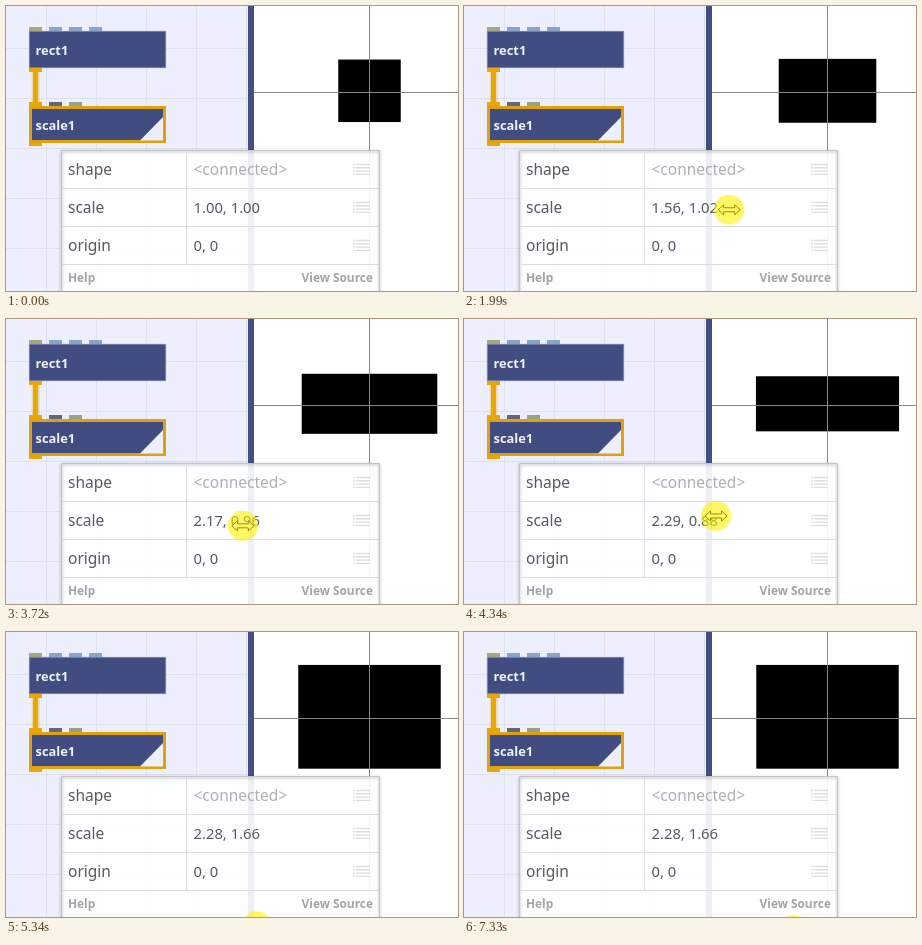
An HTML page for the animation above (7.41 s loop, 452 px wide and 285 px high).

```html
<!DOCTYPE html>
<html lang="en">
<head>
<meta charset="utf-8">
<title>Scaling a rectangle</title>
<style>
html, body { margin: 0; width: 100%; height: 100%; overflow: hidden; background: #fff; }
svg { display: block; width: 452px; height: 285px; font: 15.5px "Noto Sans", "Open Sans", sans-serif; fill: #5a5a5a; }
.node { font-size: 12.9px; font-weight: 600; fill: #f0f2fa; }
.value { font-size: 14.8px; }
.muted { fill: #b0b0b0; }
.foot { font-size: 11.9px; font-weight: 600; fill: #a4a4a4; }
.lines { stroke: #ddd; fill: none; }
#edge { fill: none; stroke: #c4c4c4; filter: drop-shadow(0 1px 1.5px #0006); }
#cursor { fill: #fff; stroke: #000; stroke-linejoin: round; }
</style>
</head>
<body>
<svg viewBox="0 0 452 285">
  <pattern id="grid" x="40" y="42" width="50" height="50" patternUnits="userSpaceOnUse">
    <path fill="#edf0fc" d="M0 0H50V50H0Z"/>
    <path stroke="#dfe2ee" d="M.5 0V50M0 .5H50"/>
  </pattern>
  <path fill="url(#grid)" d="M0 0H242V285H0Z"/>
  <path fill="#434f83" d="M242 0H248V285H242Z"/>

  <rect id="shape" fill="#000"/>
  <path stroke="#888" d="M248 86.5H452M363.5 0V285"/>

  <path fill="#a6a77a" d="M23 21h13v4h-13z"/>
  <path fill="#87a5c9" d="M43 21h13v4h-13zM63 21h13v4h-13zM83 21h13v4h-13z"/>
  <path fill="#62677f" d="M43 96h13v4h-13z"/>
  <path fill="#93a486" d="M63 96h13v4h-13z"/>
  <path fill="#414d80" stroke="#7c85ab" stroke-width=".6" d="M23.3 25.3H159.7V61.7H23.3Z"/>
  <path stroke="#e9a703" stroke-opacity=".3" stroke-width="8" d="M29.7 66V96"/>
  <path fill="#e9a703" d="M23 62h13v4h-4v30h4v4h-13v-4h4v-30h-4zM23 136h13v4h-13z"/>
  <path fill="#414d80" stroke="#e0a20c" stroke-width="3" d="M24.5 101.5H158.5V135.5H24.5Z"/>
  <path fill="#edf0fc" d="M157 111V134.5H134Z"/>
  <text class="node" x="29.5" y="49">rect1</text>
  <text class="node" x="29.5" y="124">scale1</text>

  <path fill="#fff" fill-opacity=".91" d="M55 144H374V290H55Z"/>
  <path id="edge" d="M55.5 144.5H373.5V290H55.5Z"/>
  <path id="hover" fill="#f0f0f0" d="M337 183H373V220H337Z"/>
  <path class="lines" d="M56 182.5H373M56 220.5H373M56 258.5H373M180.5 145V258"/>
  <g id="icons" class="lines" stroke-width="1.4"></g>
  <text x="62" y="169">shape</text>
  <text x="62" y="207">scale</text>
  <text x="62" y="245">origin</text>
  <text class="muted" x="187.5" y="169">&lt;connected&gt;</text>
  <text class="value" x="187.5" y="207" id="scale"></text>
  <text class="value" x="187.5" y="245">0, 0</text>
  <text class="foot" x="62" y="276">Help</text>
  <text class="foot" x="367" y="276" text-anchor="end">View Source</text>

  <g id="mouse">
    <path id="cursor"/>
    <circle id="press" r="15" fill="#fff200" fill-opacity=".6"/>
  </g>
</svg>
<script>
const LOOP = 7410, GAIN = 0.008, UNIT = 62.5;
const $ = id => document.getElementById(id);

const linear = u => u;
const slowStart = u => u ** 1.446;
const slowEnd = u => 1 - (1 - u) ** 2;

// Each move goes on from the last one; bend pushes the middle of its path aside.
const home = [283, 290];
const moves = [
  { start: 140, end: 900, to: [195, 201], bend: [0, 0], ease: linear },
  { start: 1140, end: 2620, to: [351.25, 197.25], bend: [0, 4.5], ease: slowStart, drag: true },
  { start: 2800, end: 3500, to: [247, 208], bend: [0, 20], ease: slowEnd },
  { start: 3650, end: 4340, to: [253.25, 196.75], bend: [-34, 0], ease: linear, drag: true },
  { start: 4340, end: 5340, to: [250.75, 294.25], bend: [-194, 0], ease: slowEnd, drag: true },
  { start: 5970, end: 7020, to: [330, 298], bend: [-70, -95], ease: linear }
];
const presses = [[1140, 2800], [3650, 5730], [7330, LOOP]];

const cursors = {
  resize: "M-11 0L-5.5-5V-2H5.5V-5L11 0 5.5 5V2H-5.5V5Z",
  hand: "M-3.5 14V4Q-3.5 2-1.7 2T0 4V10Q3.5 8.5 3.5 11 7 9.5 7 12 10 11 10 14V18Q10 21 7.5 25H-1Q-3 21-5 18L-8 14.5Q-8 12-5.5 13L-3.5 15Z",
  pointer: "M0 0V16L4 12.5 6.5 18 9 17 6.5 11.5H11.5Z"
};

function list(y) {
  let d = "";
  for (let i = 0; i < 4; i++) d += `M347 ${y + i * 3.3}h2m1 0h14`;
  return `<path d="${d}"/>`;
}
for (let row = 0; row < 3; row++) $("icons").innerHTML += list(158.5 + row * 38);

// Dragging adds the mouse's travel to the scale.
function stateAt(t) {
  let pos = home, scale = [1, 1];
  for (const m of moves) {
    if (t < m.start) break;
    const k = m.ease(Math.min(1, (t - m.start) / (m.end - m.start)));
    const travel = pos.map((p, i) => (m.to[i] - p) * k + m.bend[i] * Math.sin(Math.PI * k));
    pos = pos.map((p, i) => p + travel[i]);
    if (m.drag) scale = scale.map((s, i) => s + travel[i] * GAIN);
  }
  return { pos, scale };
}

function set(id, attrs) {
  for (const name in attrs) $(id).setAttribute(name, attrs[name]);
}
const visible = on => ({ visibility: on ? "visible" : "hidden" });

function draw(t) {
  const { pos: [x, y], scale } = stateAt(t);
  const [w, h] = scale.map(s => s * UNIT);
  set("shape", { x: 363.5 - w / 2, y: 84.8 - h / 2, width: w, height: h });
  $("scale").textContent = scale.map(s => s.toFixed(2)).join(", ");

  const onRow = y > 183 && y < 258;
  const onIcon = onRow && x > 337 && x < 373;
  const onValue = onRow && x > 181 && x < 337;
  set("mouse", { transform: `translate(${x} ${y})` });
  set("cursor", { d: cursors[onIcon ? "hand" : onValue ? "resize" : "pointer"] });
  set("press", visible(presses.some(([a, b]) => t >= a && t < b)));
  set("hover", visible(onIcon));
  $("icons").children[1].style.stroke = onIcon ? "#444" : "";
}

const begin = performance.now();
function frame() {
  draw((performance.now() - begin) % LOOP);
  requestAnimationFrame(frame);
}
frame();
</script>
</body>
</html>
```
